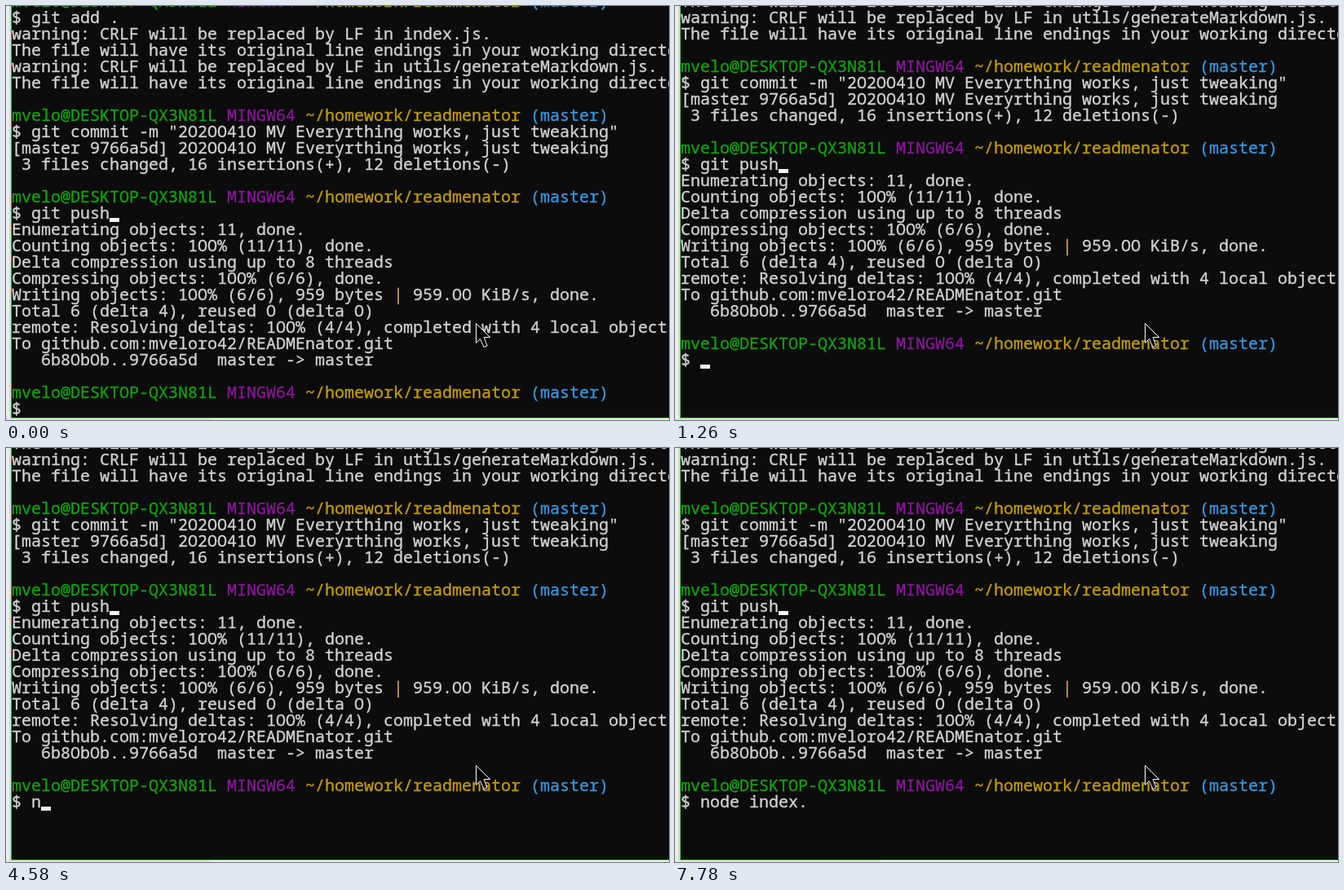
Recreate the animation shown at these times as an HTML page with a canvas. Size 813 by 508 pixels, loop 8000 ms.

```html
<!DOCTYPE html>
<html lang="en">
<head>
<meta charset="utf-8">
<title>Terminal session</title>
<style>
  html, body { margin: 0; width: 100%; height: 100%; overflow: hidden; background: #0c0c0c; }
  canvas { display: block; }
</style>
</head>
<body>
<canvas id="stage" width="813" height="508"></canvas>
<script>
const ctx = document.getElementById("stage").getContext("2d", { alpha: false });
const LOOP = 8000, LEFT = 7, CELL = 12, ROW = 20, FIRST_TOP = -15;
const COLORS = {
  back: "#0c0c0c", text: "#d2d2d2", cursor: "#f2f2f2", green: "#13a10e",
  purple: "#881798", yellow: "#c19c00", blue: "#3a96dd", bar: "#d6a06a"
};

const prompt = [
  ["mvelo@DESKTOP-QX3N81L ", "green"], ["MINGW64 ", "purple"],
  ["~/homework/readmenator ", "yellow"], ["(master)", "blue"]
];
const plain = text => [[text, "text"]];
const endings = plain("The file will have its original line endings in your working directory");

const lines = [
  prompt,
  plain("$ git add ."),
  plain("warning: CRLF will be replaced by LF in index.js."),
  endings,
  plain("warning: CRLF will be replaced by LF in utils/generateMarkdown.js."),
  endings,
  [],
  prompt,
  plain('$ git commit -m "20200410 MV Everyrthing works, just tweaking"'),
  plain("[master 9766a5d] 20200410 MV Everyrthing works, just tweaking"),
  plain(" 3 files changed, 16 insertions(+), 12 deletions(-)"),
  [],
  prompt,
  plain("$ git push"),
  plain("Enumerating objects: 11, done."),
  plain("Counting objects: 100% (11/11), done."),
  plain("Delta compression using up to 8 threads"),
  plain("Compressing objects: 100% (6/6), done."),
  [["Writing objects: 100% (6/6), 959 bytes ", "text"], ["|", "bar"], [" 959.00 KiB/s, done.", "text"]],
  plain("Total 6 (delta 4), reused 0 (delta 0)"),
  plain("remote: Resolving deltas: 100% (4/4), completed with 4 local objects."),
  plain("To github.com:mveloro42/READMEnator.git"),
  plain("   6b80b0b..9766a5d  master -> master"),
  [],
  prompt
];
const PUSH_ROW = 13, INPUT_ROW = lines.length;

// [start ms, rows scrolled]
const scrolls = [[0, 0], [430, 9], [1110, 6], [1260, 3]];

// [start ms, characters typed, cursor visible]
const COMMAND = "node index.";
const typing = [
  [0, 0, false], [1110, 0, true], [2040, 0, false], [2470, 0, true],
  [3000, 0, false], [3560, 0, true], [4120, 0, false],
  [4580, 1, true], [4700, 2, true], [4850, 3, true], [5100, 4, false],
  [5660, 4, true], [6220, 5, true], [6340, 6, true], [6490, 7, true],
  [6800, 7, false], [7080, 8, true], [7230, 9, false],
  [7380, 10, true], [7530, 11, true], [7780, 11, false]
];

const stateAt = (steps, time) => steps.findLast(step => step[0] <= time);
const fillRect = (color, ...box) => { ctx.fillStyle = color; ctx.fillRect(...box); };

function drawLine(runs, top) {
  let column = 0;
  for (const [text, color] of runs) {
    // The console face has an open zero, without slash or dot.
    const glyphs = text.replaceAll("0", "O");
    const x = LEFT + column * CELL, baseline = top + 16;
    ctx.fillStyle = ctx.strokeStyle = COLORS[color];
    ctx.fillText(glyphs, x, baseline);
    // A hairline outline gives the heavier console strokes.
    ctx.lineWidth = 0.35;
    ctx.strokeText(glyphs, x, baseline);
    column += text.length;
  }
}

function drawCursor(column, top) {
  fillRect(COLORS.cursor, LEFT + column * CELL, top + 15, CELL, 5);
}

function drawWindowEdge() {
  fillRect("#ececec", 0, 0, 6, 508);
  fillRect("#d8d8d8", 4, 0, 2, 508);
  fillRect("#e6e6e6", 0, 506, 251, 2);
  fillRect("#f3f3f3", 251, 506, 562, 2);
  fillRect("#3fc43a", 6, 0, 1, 506);
  fillRect("#3fc43a", 6, 505, 807, 1);
}

const pointer = new Path2D("M576.5 389.5V413.5L581.5 408.5L586 418.5L590 417L586 406.5H593.5Z");

function drawPointer() {
  ctx.fillStyle = "#000";
  ctx.fill(pointer);
  ctx.strokeStyle = "#fff";
  ctx.lineWidth = 1;
  ctx.stroke(pointer);
}

function draw(now) {
  const time = now % LOOP;
  const [, scroll] = stateAt(scrolls, time);
  const [, typed, cursorOn] = stateAt(typing, time);
  const rowTop = row => FIRST_TOP + (row - scroll) * ROW;

  fillRect(COLORS.back, 0, 0, 813, 508);
  ctx.font = '20px "Noto Sans Mono", "DejaVu Sans Mono", monospace';
  lines.forEach((runs, row) => drawLine(runs, rowTop(row)));
  drawCursor(10, rowTop(PUSH_ROW));
  drawLine(plain("$ " + COMMAND.slice(0, typed)), rowTop(INPUT_ROW));
  if (cursorOn) drawCursor(2 + typed, rowTop(INPUT_ROW));
  drawWindowEdge();
  drawPointer();
}

const start = performance.now();
function tick() {
  draw(performance.now() - start);
  requestAnimationFrame(tick);
}
tick();
</script>
</body>
</html>
```
